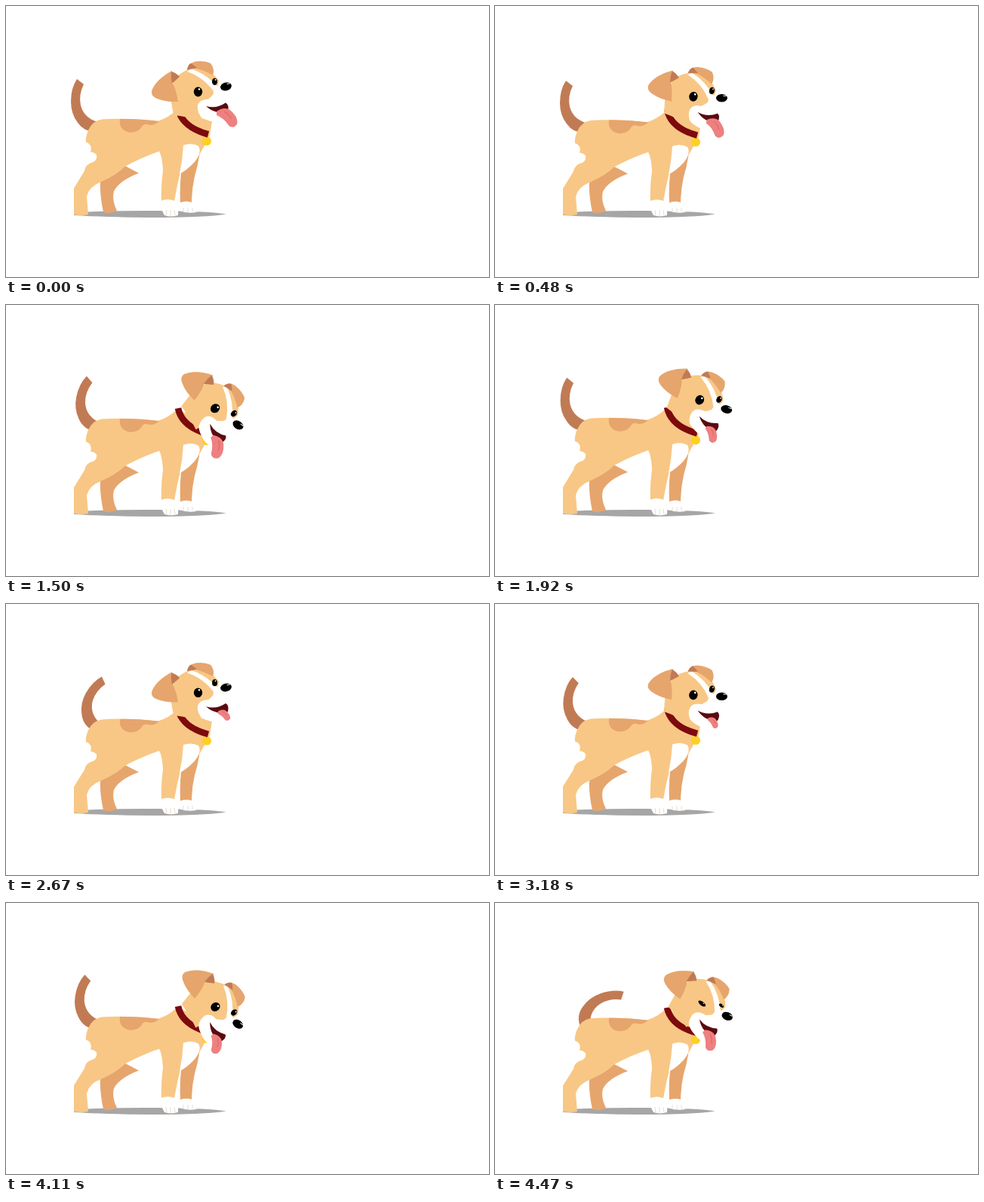
An HTML page for the animation above (4.5 s loop, 640 by 360 pixels).

```html
<!DOCTYPE html>
<html lang="en">
<head>
<meta charset="utf-8">
<title>Happy puppy</title>
<style>
  html, body { margin: 0; height: 100%; overflow: hidden; background: #fff; }
  svg { display: block; width: 100vw; height: 100vh; }
  .coat { fill: #f8c785; }
  .patch { fill: #e6a56d; }
  .brown { fill: #c17b54; }
  .white { fill: #fff; }
  .line { fill: none; stroke: #e3d3c4; stroke-width: .8; }
</style>
</head>
<body>
<svg viewBox="0 0 640 360">
  <path fill="#a6a6a6" d="M90 274.500Q130 271.500 200 272Q265 272.500 292 276.500Q265 281 190 281Q130 280.500 90 278Z"/>

  <g id="dog">
    <path id="tail" class="brown" d="M94 97L103 104Q96 118 99 132Q104 151 126 155L120 167Q104 168 95 155Q86 143 86 127Q86 109 94 97Z"/>

    <!-- far legs -->
    <path class="patch" d="M155 211L176 222Q150 232 143 246Q140 258 147 272Q138 277 129 274Q124 250 125 234L130 222Z"/>
    <path class="patch" d="M232 217L257 192Q255 210 250 226Q246 244 246 262H231Q230 240 232 222Z"/>
    <path class="white" d="M231 261Q239 258 247 261Q253 267 252 274Q240 276 230 272Z"/>
    <path class="line" d="M235 268v5M241 268v6M247 268v5"/>

    <!-- body -->
    <path class="coat" d="M106 181Q105 175 109 165Q115 152 127 150.500Q160 148 201 153Q216 148 226 138L240 143L273 153L270 172Q264 184 256 198L231 221Q226 240 223 260H206Q205 240 208 218Q207 200 203 193Q180 201 158 213Q146 225 125 234Q110 240 107 253L109 277Q100 279 90 277V242L104 219Q105 210 116 207Q121 204 120 198Q117 194 112 194Q115 184 106 181Z"/>
    <path class="patch" d="M151 150Q176 149.500 203 153Q197 159 190 158Q182 155 179 162Q174 168 164 168Q149 165 151 150Z"/>
    <path class="white" d="M235 185Q246 181 255 186Q260 195 250 207Q240 218 230 223Q234 204 235 185Z"/>
    <path class="white" d="M205 259Q214 255 224 259Q229 266 228 278Q218 281 210 278Q205 270 205 259Z"/>
    <path class="line" d="M212 271l1 7M218 271v8M223 271l1 7"/>

    <circle cx="266" cy="179.500" r="6" fill="#fdd022"/>
    <path d="M228 136Q233 161 268 170.500" fill="none" stroke="#7d0a0d" stroke-width="8.600"/>

    <g id="head">
      <path class="coat" d="M222 98Q230 89 242 84L262 82Q276 90 282 99L281 106L275 117L262 130L258 152L247 149L230 146L222 145L219 128Z"/>
      <path class="white" d="M240 87L245 83.500Q265 90 279 106L290 104Q299 119 296 132L284 154Q277 155 272 153Q263 151 258 147Q253 140 254 132Q256 125 265 124Q275 124 275 113Q262 95 240 87Z"/>
      <path class="patch" d="M220 86Q198 98 193 113Q192 120 200 123Q212 128 228 127Q226 112 220 101Z"/>
      <path class="brown" d="M219 87Q226 89 230 94L220 103Q218 95 219 87Z"/>
      <path class="patch" d="M240 84Q242 76 250 74Q262 72 271 76Q277 84 274 92Q262 85 252 83Z"/>
      <path class="brown" d="M240 85Q241 78 245 76L253 82Z"/>
      <g class="eye">
        <ellipse cx="254.500" cy="114" rx="5.700" ry="6.500"/>
        <circle class="white" cx="256" cy="110.500" r="1.300"/>
      </g>
      <g class="eye">
        <ellipse cx="276.500" cy="100.500" rx="3.500" ry="4.700"/>
        <circle class="white" cx="277.500" cy="98" r=".9"/>
      </g>
      <ellipse cx="291.500" cy="107" rx="7.500" ry="5.400" transform="rotate(-14 291.500 107)"/>
      <path d="M293 103.500l3.500 -.5" stroke="#fff" stroke-linecap="round"/>
      <path fill="#5a0b10" d="M265 133Q279 137 291 128.500Q296 131 294 140Q278 145 265 133Z"/>
      <g id="tongue">
        <path fill="#ee8080" d="M279 140Q289 133 297 138Q308 147 307 156Q303 164 296 160Q289 149 279 145Z"/>
        <path d="M289 140Q297 144 299 150" fill="none" stroke="#c9605f" stroke-width=".8"/>
      </g>
    </g>
  </g>
</svg>
<script>
const LOOP = 4500, STEP = 30, GROUND = 278;
const $ = id => document.getElementById(id);
const wave = (t, period) => Math.cos(2 * Math.PI * t / period);
const swell = (t, period) => (1 - wave(t, period)) / 2;
const turn = (node, angle, x, y) =>
  node.setAttribute('transform', `rotate(${angle} ${x} ${y})`);
const scaleAt = (node, sx, sy, x, y) =>
  node.setAttribute('transform', `translate(${x} ${y}) scale(${sx} ${sy}) translate(${-x} ${-y})`);
const eyes = [...document.querySelectorAll('.eye')];
const eyeCentres = [[254.5, 114], [276.5, 100.5]];

function draw(t) {
  // Breathing lowers the whole dog a little towards its paws.
  scaleAt($('dog'), 1, 1 - .024 * swell(t, 1870), 0, GROUND);
  turn($('head'), 48.6 * swell(t, 2700), 240.5, 151);
  turn($('tail'), 78 * swell(t, 467) ** 2, 120, 160);

  const reach = 1 - .68 * swell(t - 28, 500);
  scaleAt($('tongue'), reach, reach, 283, 139);

  const open = t < 4400 ? 1 : Math.max(.1, 1 - (t - 4400) / 120);
  eyes.forEach((eye, i) => scaleAt(eye, 1, open, ...eyeCentres[i]));
}

function tick() {
  const t = performance.now() % LOOP;
  draw(Math.floor(t / STEP) * STEP);
  requestAnimationFrame(tick);
}
tick();
</script>
</body>
</html>
```
